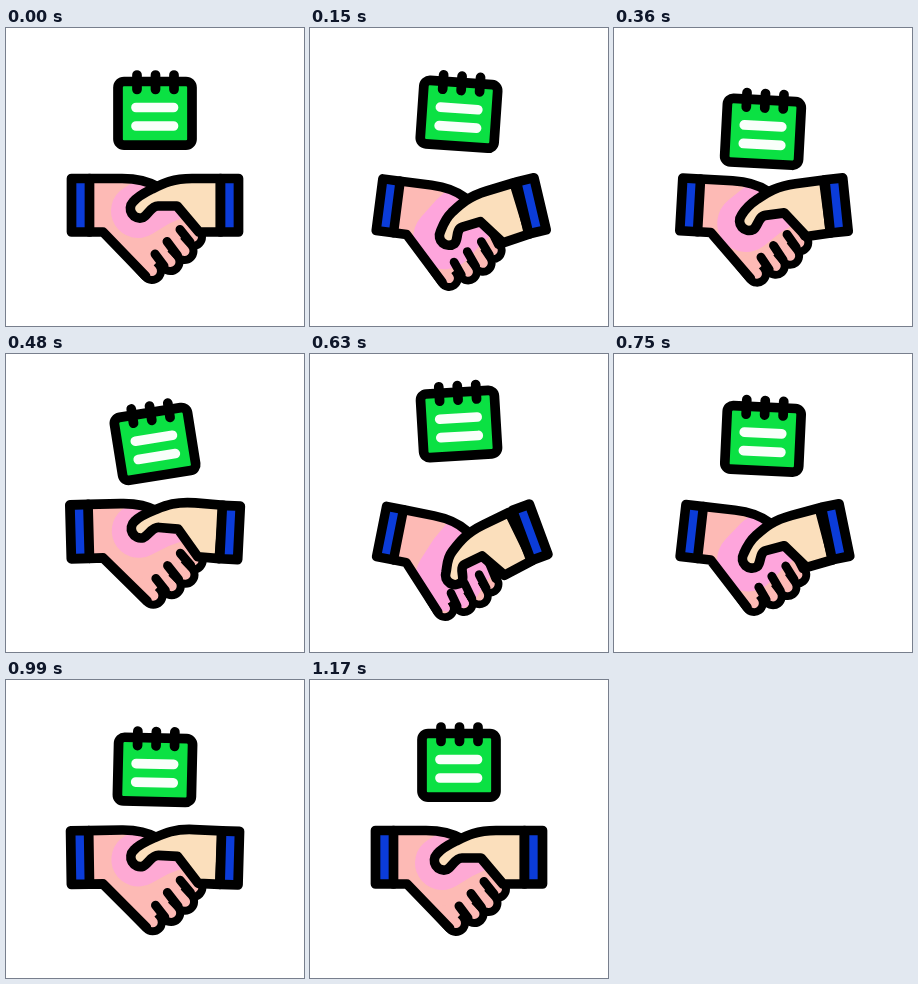
Write an HTML page that moves like this. It is 298x298 px and loops after 1.5 s.

```html
<!DOCTYPE html>
<html lang="en">
<head>
<meta charset="utf-8">
<title>Handshake and notepad</title>
<style>
  html, body { margin: 0; width: 100%; height: 100%; overflow: hidden; background: #fff; }
  svg { display: block; width: 100vw; height: 100vh; }
  .line { fill: none; stroke: #000; stroke-width: 9.7; stroke-linecap: round; stroke-linejoin: round; }
  .gap { fill: none; stroke: #000; stroke-width: 9; stroke-linecap: round; }
  .finger { fill: none; stroke: currentColor; stroke-width: 10; stroke-linecap: round; }
</style>
</head>
<body>
<svg viewBox="0 0 298 298">
  <defs>
    <path id="fingers" d="M134 230 L146 243 M153 222 L164.5 234 M166 209 L178.5 223 M174 196 L187 209"/>
    <g id="skin">
      <path fill="currentColor" d="M83.5 150.5 H116 C132 150.5 142 153 152 159 L176 178 L190 201 L179 206 L167 218 L155 230 L140 245 L97 204 H83.5Z"/>
      <use href="#fingers" class="finger"/>
    </g>
    <mask id="palm" maskUnits="userSpaceOnUse" x="0" y="0" width="298" height="298">
      <g class="left" color="#fff"><use href="#skin"/></g>
    </mask>
  </defs>

  <g class="left" color="#fdbab5">
    <use href="#fingers" fill="none" stroke="#000" stroke-width="26" stroke-linecap="round"/>
    <use href="#skin"/>
  </g>
  <g mask="url(#palm)">
    <g class="hand">
      <path id="glow" d="M132 183 L150 172 L172 162" fill="none" stroke="#fea5dc" stroke-linecap="round" stroke-linejoin="round"/>
    </g>
  </g>
  <g class="left">
    <path class="gap" d="M149 226 L158 238 M161 213.5 L171.5 227.5 M174 201.5 L184 214"/>
    <path class="line" d="M139.5 248 L97 204 H83.5 M83.5 150.5 H116 C132 150.5 142 153 152 159 L176 178 L192 202"/>
    <path class="line" style="fill:#0b3cd9" d="M65.5 150.5 H83.5 V204 H65.5Z"/>
  </g>
  <g class="hand">
    <path id="grip" class="line" style="fill:#fbdfbc"/>
  </g>
  <g class="cuff">
    <path class="line" style="fill:#0b3cd9" d="M214.5 150.5 H232.5 V204 H214.5Z"/>
  </g>

  <g id="pad">
    <rect class="line" style="fill:#0be143" x="112" y="53.5" width="74" height="63.7" rx="6"/>
    <path class="line" d="M131 47 V61.5 M149.5 47 V61.5 M168 47 V61.5"/>
    <path class="line" style="stroke:#f9fffa" d="M130 79.5 H167.5 M130 98 H167.5"/>
  </g>
</svg>
<script>
  const LOOP = 1500, STEP = 30;

  // Keys are [time, value]; values ease in and out between them.
  const shake = [[30, 0], [240, 12], [450, -2.3], [660, 12], [870, -2.3], [1080, 0]];
  const padY = [[30, 0], [110, 0], [390, 19], [595, -16.5], [850, 7.5], [1170, 0]];
  const padTurn = [[30, 0], [160, 4], [340, 3.6], [490, -9.2], [780, 3], [1170, 0]];

  function at(keys, t) {
    if (t <= keys[0][0]) return keys[0][1];
    for (let i = 1; i < keys.length; i++) {
      const [t0, v0] = keys[i - 1], [t1, v1] = keys[i];
      if (t <= t1) {
        const p = (t - t0) / (t1 - t0);
        return v0 + (v1 - v0) * (1 - Math.cos(Math.PI * p)) / 2;
      }
    }
    return keys[keys.length - 1][1];
  }

  function pivot(x, y, dy, turn, scale = 1) {
    return `translate(${x} ${y + dy}) rotate(${turn}) scale(${scale}) translate(${-x} ${-y})`;
  }

  // The thumb curls and the wrist stretches as the hands dip.
  function gripPath(a) {
    const p = (x, y) => `${x + 0.4 * a} ${y + 0.25 * a}`;
    return `M214.5 150.5 H186 C166 150.5 156 156 146 161
      C138 165 ${p(131, 169)} ${p(127, 174)} A9.5 9.5 0 0 0 ${p(137, 189.5)}
      C${p(142, 187)} 145 178 152 178 H171 L${193 - 0.9 * a} ${204 + 0.1 * a} L214.5 204Z`;
  }

  const all = s => document.querySelectorAll(s);
  const lefts = all('.left'), hands = all('.hand'), cuffs = all('.cuff'), pads = all('#pad');
  const glow = document.getElementById('glow');
  const grip = document.getElementById('grip');
  const move = (list, value) => list.forEach(el => el.setAttribute('transform', value));

  function draw(ms) {
    const t = Math.floor(ms % LOOP / STEP) * STEP;
    const a = at(shake, t), dip = Math.max(0, a);
    const arm = pivot(225, 187, Math.max(0, -a) * 0.8, -1.8 * a);
    move(lefts, pivot(66, 209, -1.6 * Math.tanh(a / 3), a, 1 - 0.0035 * a));
    move(cuffs, arm);
    move(hands, arm + pivot(218, 190, 0, a < 0 ? -1.2 * a : -0.5 * a));
    grip.setAttribute('d', gripPath(dip));
    glow.setAttribute('stroke-width', 54 + 1.2 * dip);
    glow.setAttribute('stroke-opacity', Math.min(1, 0.8 + dip / 30));
    move(pads, pivot(149, 85, at(padY, t), at(padTurn, t)));
  }

  const start = performance.now();
  function tick() {
    draw(performance.now() - start);
    requestAnimationFrame(tick);
  }
  tick();
</script>
</body>
</html>
```
